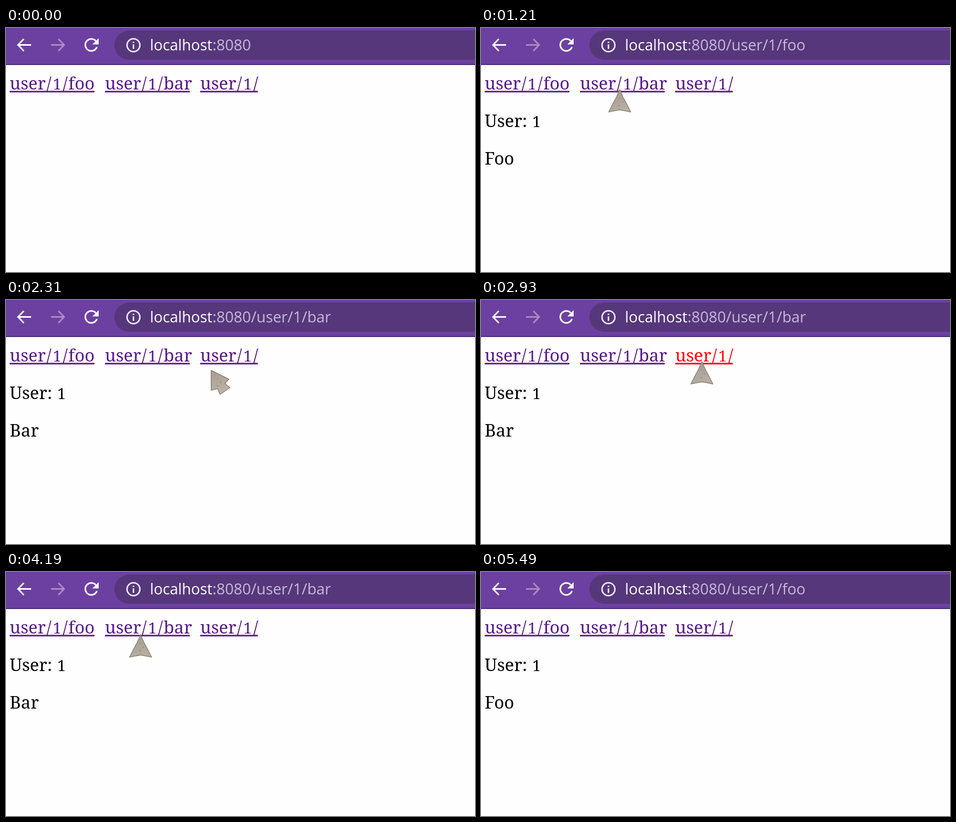
Write an HTML page with a canvas that moves like this. It is 896x468 px and loops after 5810 ms.

```html
<!DOCTYPE html>
<html lang="en">
<head>
<meta charset="utf-8">
<title>Nested routes</title>
<style>
html, body { margin: 0; width: 100%; height: 100%; overflow: hidden; background: #fefefe; }
canvas { display: block; }
</style>
</head>
<body>
<canvas id="stage" width="896" height="468"></canvas>
<script>
const ctx = document.getElementById('stage').getContext('2d');
const LOOP = 5810;
const STEP = 76;
const BAR_Y = 32.5;
const SERIF = '"Noto Serif", serif';
const SANS = '"Open Sans", "Noto Sans", sans-serif';

const links = [
  { text: 'user/1/foo', view: 'Foo', x: 7, w: 162 },
  { text: 'user/1/bar', view: 'Bar', x: 189, w: 162 },
  { text: 'user/1/', view: 'UserHome', x: 371, w: 110 }
];

// Where the pointer rests; after a press it leaves on release unless told otherwise.
const stops = [
  { come: 70, x: 529, y: 315, leave: 70 },
  { come: 510, x: 136, y: 106, press: 680 },
  { come: 1210, x: 265, y: 118, leave: 1305 },
  { come: 1530, x: 281, y: 111, press: 1760 },
  { come: 2310, x: 391, y: 134, leave: 2313 },
  { come: 2853, x: 422, y: 118, press: 2930, leave: 3380 },
  { come: 3560, x: 297, y: 124, press: 4020 },
  { come: 4560, x: 128, y: 119, press: 4960 },
  { come: 5414, x: 695, y: 450 }
];

const linkAt = ({ x, y }) =>
  links.find(l => x >= l.x && x <= l.x + l.w && y > 86 && y < 127);

const clicks = stops.filter(s => s.press)
  .map(s => ({ down: s.press, up: s.press + STEP, link: linkAt(s) }));

function pointerAt(t) {
  const i = stops.findLastIndex(s => t >= s.come);
  const from = stops[i], to = stops[i + 1];
  if (!from || (!to && t >= from.come + STEP)) return null;
  const start = from.leave ?? from.press + STEP;
  if (!to || t < start) return from;

  const span = to.come - start;
  const n = Math.round(span / STEP);
  const k = Math.floor((t - start) / span * n + 1e-6) / n;
  const u = k * (1.5 - 0.5 * k);
  const dx = to.x - from.x, dy = to.y - from.y;
  const lift = (dx * dx + dy * dy) / 4000;
  return { x: from.x + dx * u, y: from.y + dy * u - 2 * u * (1 - u) * lift };
}

function trace(points) {
  ctx.beginPath();
  points.forEach(p => ctx.lineTo(...p));
}

function disc(x, y, r) {
  ctx.beginPath();
  ctx.arc(x, y, r, 0, Math.PI * 2);
}

function arrow(x, dir, color) {
  const tip = x + 13 * dir;
  ctx.strokeStyle = color;
  ctx.lineWidth = 3;
  trace([[x - 13 * dir, BAR_Y], [tip - 2 * dir, BAR_Y]]);
  ctx.stroke();
  trace([-1, 0, 1].map(s => [tip - (1 + 11 * Math.abs(s)) * dir, BAR_Y + 11.5 * s]));
  ctx.stroke();
}

function reload(x) {
  ctx.strokeStyle = ctx.fillStyle = '#fff';
  ctx.lineWidth = 3;
  ctx.beginPath();
  ctx.arc(x, BAR_Y, 11.5, 0.35, Math.PI * 2 - 0.75);
  ctx.stroke();
  trace([[x + 14, BAR_Y - 13], [x + 14, BAR_Y - 1], [x + 2, BAR_Y - 1]]);
  ctx.fill();
}

function info(x) {
  ctx.strokeStyle = ctx.fillStyle = '#f1ecf6';
  ctx.lineWidth = 2.8;
  disc(x, BAR_Y + 0.5, 12.3);
  ctx.stroke();
  ctx.fillRect(x - 1.5, BAR_Y - 1, 3, 8.5);
  ctx.fillRect(x - 1.5, BAR_Y - 6.5, 3, 3);
}

function toolbar(path) {
  ctx.fillStyle = '#6c40a0';
  ctx.fillRect(0, 0, 896, 71);
  ctx.fillStyle = '#4a2a70';
  ctx.fillRect(0, 69, 896, 2);
  ctx.fillStyle = '#56377b';
  ctx.beginPath();
  ctx.roundRect(207, 5, 760, 56, 28);
  ctx.fill();

  arrow(35, -1, '#fff');
  arrow(99, 1, '#a98cc6');
  reload(163);
  info(243.5);

  const x = 275, host = 'localhost';
  ctx.font = '500 28.5px ' + SANS;
  ctx.fillStyle = '#fff';
  ctx.fillText(host, x, 43);
  const end = x + ctx.measureText(host).width;
  ctx.font = '28.8px ' + SANS;
  ctx.fillStyle = '#c8b9d9';
  ctx.fillText(':8080' + path, end, 43);
}

// The digit is set lower, like an old-style figure; it and slashes get some air.
function prose(text, x, y, color) {
  ctx.fillStyle = color;
  for (const part of text.split(/([1/])/)) {
    const air = /^[1/]$/.test(part) ? 1.3 : 0;
    ctx.font = (part === '1' ? 29 : 33) + 'px ' + SERIF;
    ctx.fillText(part, x + air, y);
    x += ctx.measureText(part).width + 2 * air;
  }
}

function pointer(at) {
  const onLink = linkAt(at);
  ctx.save();
  ctx.lineJoin = 'round';
  ctx.translate(at.x, at.y);
  if (onLink) {
    trace([[0, 0], [6, 14], [14, 29], [21, 43], [11, 41], [0, 39],
      [-11, 41], [-21, 43], [-14, 29], [-6, 14]]);
  } else {
    trace([[1, 1], [35, 18], [27, 26], [37, 34], [18, 47], [13, 36], [1, 39]]);
  }
  ctx.closePath();
  const stone = ctx.createLinearGradient(0, 0, 14, 44);
  stone.addColorStop(0, '#a69d92');
  stone.addColorStop(1, '#bbb2a6');
  ctx.fillStyle = stone;
  ctx.fill();
  ctx.strokeStyle = '#8a8076';
  ctx.lineWidth = 1.5;
  ctx.stroke();
  ctx.fillStyle = '#988e83';
  const shift = onLink ? -14 : 0;
  for (let i = 0; i < 3; i++) {
    disc(13 + shift + 6 * (i % 2), 17 + 7 * i, 1.2 + 0.2 * i);
    ctx.fill();
  }
  ctx.restore();
}

function draw(t) {
  ctx.fillStyle = '#fefefe';
  ctx.fillRect(0, 0, 896, 468);

  const page = clicks.findLast(c => t >= c.up)?.link;
  const active = clicks.find(c => t >= c.down && t < c.up)?.link;
  toolbar(page ? '/' + page.text : '');

  for (const link of links) {
    prose(link.text, link.x, 118, link === active ? '#f00' : '#551a8b');
    ctx.fillRect(link.x, 120.5, link.w, 3);
  }
  if (page) {
    prose('User: 1', 7, 190, '#000');
    prose(page.view, 7, 262, '#000');
  }

  const at = pointerAt(t);
  if (at) pointer(at);
}

function tick() {
  draw(performance.now() % LOOP);
  requestAnimationFrame(tick);
}
tick();
</script>
</body>
</html>
```
